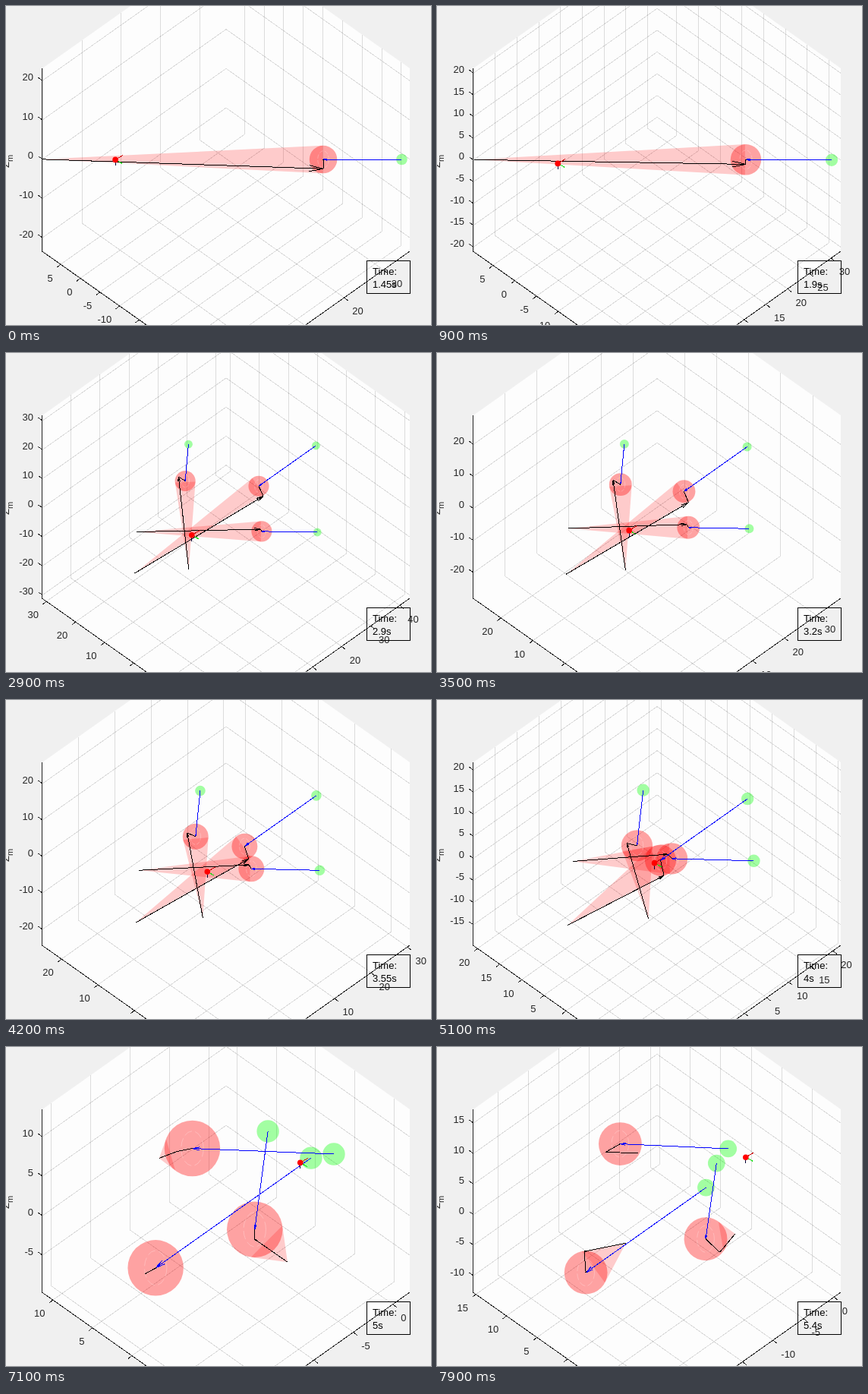
An HTML page for the animation above (8000 ms loop, 560 px wide and 420 px high).

```html
<!DOCTYPE html>
<html lang="en">
<head>
<meta charset="utf-8">
<title>Collision cones</title>
<style>
  html, body { margin: 0; width: 100%; height: 100%; overflow: hidden; background: #f0f0f0; }
  svg { display: block; width: 560px; height: 420px; }
  text { font: 13px "Liberation Sans", Arial, sans-serif; fill: #262626; }
  .grid, .axis, .line { fill: none; shape-rendering: crispEdges; }
  .grid { stroke: #262626; stroke-opacity: .15; }
  .axis { stroke: #262626; }
</style>
</head>
<body>
<svg viewBox="0 0 560 420">
  <path d="M48 82L290-89L532 82V323L290 494L48 323Z" fill="#fdfdfd"/>
  <g id="axes"></g>
  <path class="axis" d="M47.5 82V323L290 494L532 323"/>
  <text transform="translate(4 213) rotate(-90)">Z<tspan dy="5" style="font-size:11px">m</tspan></text>
  <g id="scene"></g>
  <path class="line" d="M475.5 335.5H532V378H475.5Z" stroke="#000"/>
  <text x="483" y="354" style="fill:#000">Time:</text>
  <text id="clock" x="483" y="371" style="fill:#000"></text>
</svg>
<script>
const HALF = 242, RISE = 171, HEIGHT = 241, TILT = RISE / HALF, MID_Y = 202.2;
const STEPS = 80, STEP_MS = 100, START = 1.45, DT = 0.05;
const RED_R = 2.5, GREEN_R = 1, BODY_R = 1;
const APEX_SHIFT = [-.37, -.12, 0];

// World axes are p (up left), q (up right) and z (up). Each obstacle moves with
// constant acceleration from time START and appears at time `from`.
// tip: offset of the escape point from the red sphere, in view units.
const OBSTACLES = [
  { from: 0, pos: [-36.1, 35.7, -.1], vel: [10, -10, 0], acc: [-.43, .15, .4],
    tip: s => [-.15 * s * s, 1.1 - .75 * (s - 2.15) ** 2] },
  { from: 2, pos: [34.15, 34.55, 0], vel: [-8.67, -9.42, 0], acc: [.1, -.16, .14],
    tip: (s, side) => [2.3 * side, 1.6 - .42 * (s - .95) ** 2] },
  { from: 2.5, pos: [-.5, 71, 0], vel: [0, -19.7, 0], acc: [0, 0, 0],
    tip: (s, side) => [2.7 - .75 * s, 3.45 * side] }
];

const $ = id => document.getElementById(id);
const num = v => +v.toFixed(2);
const add = (a, b, scale = 1) => a.map((v, i) => v + b[i] * scale);

const path = (cls, pts, extra = "") =>
  `<path class="${cls}" d="M${pts.map(p => p.map(num).join(" ")).join("L")}" ${extra}/>`;
const label = (x, y, value, anchor) =>
  `<text x="${num(x)}" y="${num(y)}" text-anchor="${anchor}">${value}</text>`;
const ball = ([x, y], r, fill, opacity = .36) =>
  `<circle cx="${num(x)}" cy="${num(y)}" r="${num(r)}" fill="${fill}" fill-opacity="${opacity}"/>`;
const line = (a, b, color) => path("line", [a, b], `stroke="${color}"`);

function arrow(a, b, color) {
  const dx = b[0] - a[0], dy = b[1] - a[1];
  const barb = s => [b[0] - .05 * dx - s * .011 * dy, b[1] - .05 * dy + s * .011 * dx];
  return line(a, b, color) + path("line", [barb(1), b, barb(-1)], `stroke="${color}"`);
}

function cone(apex, c, r) {
  const dx = apex[0] - c[0], dy = apex[1] - c[1], dist = Math.hypot(dx, dy);
  if (dist <= r) return "";
  const dir = Math.atan2(dy, dx), open = Math.acos(r / dist);
  const touch = s => [c[0] + r * Math.cos(dir + s * open), c[1] + r * Math.sin(dir + s * open)];
  return path("", [apex, touch(1), touch(-1)], 'fill="#f00" fill-opacity=".2"');
}

// Faint scalloped rim where the cone's mouth meets the sphere.
const rim = ([x, y], r) =>
  `<ellipse cx="${num(x)}" cy="${num(y)}" rx="${num(r * .4)}" ry="${num(r * .62)}" fill="none" stroke="#fff" stroke-opacity=".25" stroke-dasharray="${num(r * .3)} ${num(r * .12)}"/>`;

function ticks(center, range, step) {
  const list = [], max = center + range / 2;
  for (let v = Math.ceil((center - range / 2) / step) * step; v <= max; v += step) list.push(v);
  return list;
}

// One floor axis with its grid; dir is 1 for p (left edge) and -1 for q (right edge).
function floorAxis(center, range, step, k, dir) {
  return ticks(center, range, step).map(v => {
    const d = (center + range / 2 - v) * k;
    const x = 290 + dir * (d - HALF), y = 323 + d * TILT, far = x + dir * HALF;
    return path("grid", [[x, y], [far, y - RISE], [far, y - RISE - HEIGHT]]) +
      path("axis", [[x, y], [x - dir * 5, y + 4]]) +
      label(x - dir * 10.5, y + 22.5, v, dir > 0 ? "end" : "start");
  }).join("");
}

function heightAxis(center, range, step, k) {
  return ticks(center, range, step).map(v => {
    const y = MID_Y + (center - v) * k;
    return path("grid", [[48, y], [290, y - RISE], [532, y]]) +
      path("axis", [[48, y], [42.5, y - 4]]) + label(36, y - .5, v, "end");
  }).join("");
}

function sceneAt(t) {
  const s = t - START;
  const side = Math.min(1, Math.max(-1, (t - 5) / .4));
  const sway = .7 * Math.exp(-3 * s), dip = 1.6 * Math.exp(-(((t - 2.4) / .7) ** 2));
  const body = [sway - .1, .1 - sway, -.2 - dip];
  const obstacles = OBSTACLES.filter(o => t > o.from - 1e-6).map(o => {
    const vel = add(o.vel, o.acc, s);
    const green = add(add(o.pos, o.vel, s), o.acc, s * s / 2);
    return { green, red: add(green, vel), apex: add(vel, APEX_SHIFT), tip: o.tip(s, side) };
  });
  return { body, obstacles };
}

// The cube of axes is centred on everything in the scene and sized to its widest side.
function fitCamera({ body, obstacles }) {
  const items = [[body, BODY_R]];
  for (const o of obstacles) items.push([o.green, GREEN_R], [o.red, RED_R], [o.apex, 0]);
  const spans = [0, 1, 2].map(i => [
    Math.min(...items.map(([p, r]) => p[i] - r)),
    Math.max(...items.map(([p, r]) => p[i] + r))
  ]);
  return {
    center: spans.map(([lo, hi]) => (lo + hi) / 2),
    range: Math.max(...spans.map(([lo, hi]) => hi - lo))
  };
}

function drawScene({ body, obstacles }, k, toScreen) {
  const redR = RED_R * Math.SQRT2 * k, greenR = GREEN_R * Math.SQRT2 * k;
  let cones = "", balls = "", lines = "";
  for (const o of obstacles) {
    const green = toScreen(o.green), red = toScreen(o.red), apex = toScreen(o.apex);
    const tip = [red[0] + o.tip[0] * k, red[1] - o.tip[1] * k];
    cones += cone(apex, red, redR);
    balls += ball(red, redR, "#f00") + rim(red, redR) + ball(green, greenR, "#0f0");
    lines += arrow(green, red, "#00f") + arrow(apex, tip, "#000") + arrow(tip, red, "#000");
  }
  const c = toScreen(body), arm = (dx, dy, color) => line(c, add(c, [dx, dy]), color);
  return cones + balls + lines +
    arm(10, -6, "#c00") + arm(9, 5, "#0d0") + arm(0, 8, "#003") + ball(c, 3.8, "#f00", 1);
}

function render(n) {
  const t = START + n * DT, scene = sceneAt(t);
  const { center, range } = fitCamera(scene);
  const [pc, qc, zc] = center, k = HALF / range;
  const toScreen = point => {
    const [p, q, z] = add(point, center, -1);
    return [290 + (q - p) * k, MID_Y - (TILT * (p + q) + z) * k];
  };
  const step = limit => range > limit ? 10 : 5;
  $("axes").innerHTML = floorAxis(pc, range, step(48), k, 1) +
    floorAxis(qc, range, step(45), k, -1) + heightAxis(zc, range, step(45), k);
  $("scene").innerHTML = drawScene(scene, k, toScreen);
  $("clock").textContent = num(t) + "s";
}

const began = performance.now();
let shown = -1;
function tick() {
  const n = Math.floor((performance.now() - began) / STEP_MS) % STEPS;
  if (n !== shown) render(shown = n);
  requestAnimationFrame(tick);
}
tick();
</script>
</body>
</html>
```
